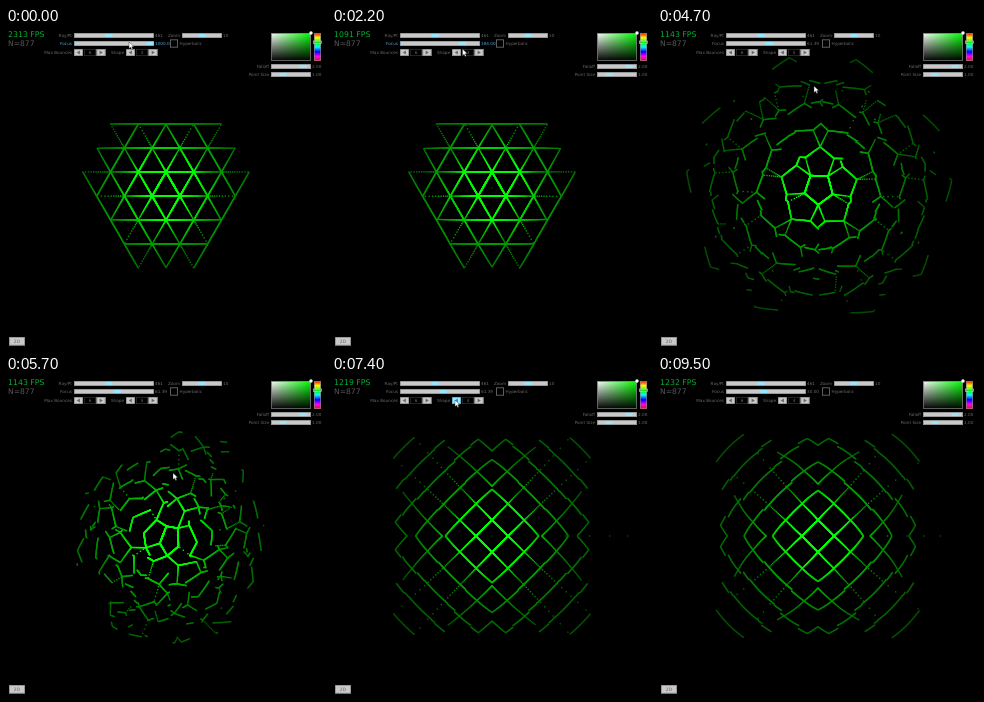
Animation, 320 px wide and 320 px high, one loop 9600 ms. Source, as an HTML page with a canvas:

```html
<!DOCTYPE html>
<html>
<head>
<meta charset="utf-8">
<style>
html, body { margin: 0; width: 100%; height: 100%; overflow: hidden; background: #000; }
canvas { display: block; width: 320px; height: 320px; }
</style>
</head>
<body>
<canvas id="stage" width="320" height="320"></canvas>
<script>
const ctx = document.getElementById('stage').getContext('2d');
const LOOP = 9600, STEP = 100, TAU = Math.PI * 2;
const RAYS = 877, BOUNCES = 6, RADIUS = 16, MID = 160;
const GRAY = '#686868', BORDER = '#838383', BASE = '#c9c9c9', THUMB = '#97e8ff', ACTIVE = '#4e9fcb';
const RIGHT_ARROW = [147, 26], LEFT_ARROW = [123, 24], ROOM_SPOT = [167, 97];

const mix = (a, b, k) => a + (b - a) * k;

function ramp(t, from, to) {
  const k = Math.min(1, Math.max(0, (t - from) / (to - from)));
  return k * k * (3 - 2 * k);
}

// The focus slider is a power curve, so positions are eased rather than values.
const toLevel = focus => (focus / 1000) ** (1 / 4.6);
const toFocus = level => 1000 * level ** 4.6;

function focusLevel(t) {
  let level = mix(1, toLevel(5), ramp(t, 200, 1000));
  level = mix(level, toLevel(384), ramp(t, 1300, 2200));
  level = mix(level, toLevel(61.39), ramp(t, 2200, 2900));
  level = mix(level, toLevel(16), ramp(t, 8000, 8600));
  return mix(level, toLevel(30), ramp(t, 8600, 9100));
}

function cursorAt(t, thumbX) {
  const slider = [thumbX, 14 + 7 * ramp(t, 1300, 2200) * (1 - ramp(t, 7100, 8000))];
  const glide = (a, b, from, to) => a.map((v, i) => mix(v, b[i], ramp(t, from, to)));
  let p = glide([123, 14], slider, 0, 200);
  p = glide(p, RIGHT_ARROW, 2900, 3200);
  p = glide(p, ROOM_SPOT, 4000, 5500);
  p = glide(p, LEFT_ARROW, 6000, 7100);
  p = glide(p, slider, 7700, 8000);
  return glide(p, [thumbX, -10], 9100, 9400);
}

function sidesAt(t) {
  if (t < 3300) return 3;
  return t >= 3800 && t < 7300 ? 5 : 4;
}

function fpsAt(t) {
  if (t < 1000) return 2313;
  if (t < 2500) return 1091;
  if (t < 4600) return 1548;
  if (t < 6600) return 1143;
  return t < 8600 ? 1219 : 1232;
}

// Corners around the viewer; warp squeezes, tilts and shifts the room.
function corners(sides, warp) {
  const start = sides === 5 ? TAU / 4 : -TAU / 4;
  const tilt = 0.17 * warp, squeeze = 1 - 0.38 * warp;
  return Array.from({ length: sides }, (_, k) => {
    const a = start + k * TAU / sides;
    const x = RADIUS * squeeze * Math.cos(a), y = RADIUS * Math.sin(a);
    return [
      x * Math.cos(tilt) - y * Math.sin(tilt) + 4 * warp,
      x * Math.sin(tilt) + y * Math.cos(tilt) + 4 * warp
    ];
  });
}

// Each curved wall is a disc; the room is where all of them overlap.
function mirrors(points, curve) {
  return points.map(([x, y], i) => {
    const [x2, y2] = points[(i + 1) % points.length];
    const side = Math.hypot(x2 - x, y2 - y);
    const depth = Math.sqrt(curve * curve - side * side / 4) / side;
    return [(x + x2) / 2 - (y2 - y) * depth, (y + y2) / 2 + (x2 - x) * depth];
  });
}

function drawRoom(centers, curve) {
  const size = 1.35;
  for (let i = 0; i < RAYS; i++) {
    const angle = i / RAYS * TAU;
    const ux = Math.cos(angle), uy = Math.sin(angle);
    let x = 0, y = 0, dx = ux, dy = uy, length = 0;
    for (let n = 0; n < BOUNCES; n++) {
      let best = Infinity, hit;
      for (const c of centers) {
        const px = x - c[0], py = y - c[1];
        const b = px * dx + py * dy;
        const d = Math.sqrt(Math.max(0, b * b - px * px - py * py + curve * curve)) - b;
        if (d > 1e-6 && d < best) { best = d; hit = c; }
      }
      if (!hit) break;
      x += dx * best;
      y += dy * best;
      length += best;
      const nx = (x - hit[0]) / curve, ny = (y - hit[1]) / curve;
      const dot = 2 * (dx * nx + dy * ny);
      dx -= dot * nx;
      dy -= dot * ny;
      const green = Math.round(255 * Math.min(1, (32 / length) ** 0.8));
      ctx.fillStyle = `rgb(0,${green},0)`;
      ctx.fillRect(MID + ux * length - size / 2, MID + uy * length - size / 2, size, size);
    }
  }
  ctx.fillStyle = '#0a700a';
  ctx.fillRect(MID - 0.5, MID - 0.5, 1, 1);
}

function text(str, x, y, color = GRAY, align = 'left', size = 4.2) {
  ctx.font = `${size}px "DejaVu Sans", sans-serif`;
  ctx.textAlign = align;
  ctx.textBaseline = 'middle';
  ctx.fillStyle = color;
  ctx.fillText(str, x, y);
}

function box(x, y, w, h, fill, stroke = BORDER) {
  ctx.fillStyle = fill;
  ctx.fillRect(x, y, w, h);
  ctx.strokeStyle = stroke;
  ctx.lineWidth = 0.7;
  ctx.strokeRect(x + 0.35, y + 0.35, w - 0.7, h - 0.7);
}

function slider(label, x, y, w, thumbX, value, active) {
  const color = active ? ACTIVE : GRAY;
  box(x, y, w, 5, BASE, active ? ACTIVE : BORDER);
  ctx.fillStyle = THUMB;
  ctx.fillRect(thumbX - 3.5, y + 1, 7, 3);
  text(label, x - 2, y + 2.6, color, 'right');
  text(value, x + w + 1, y + 2.6, color);
}

function arrowButton(x, dir, hot) {
  box(x, 21, 9, 7, hot ? THUMB : BASE, hot ? ACTIVE : BORDER);
  ctx.fillStyle = hot ? '#368baf' : GRAY;
  ctx.beginPath();
  ctx.moveTo(x + 4.5 + dir * 1.8, 24.5);
  ctx.lineTo(x + 4.5 - dir * 1.4, 22.6);
  ctx.lineTo(x + 4.5 - dir * 1.4, 26.4);
  ctx.fill();
}

function spinner(label, x, value, hot) {
  text(label, x - 2, 24.6, GRAY, 'right');
  arrowButton(x, -1, hot === -1);
  box(x + 10, 21, 12, 7, '#000', '#333');
  text(value, x + 16, 24.6, GRAY, 'center');
  arrowButton(x + 22.5, 1, hot === 1);
}

function gradient(x1, y1, colors) {
  const g = ctx.createLinearGradient(265, 5, x1, y1);
  colors.forEach((c, i) => g.addColorStop(i / (colors.length - 1), c));
  return g;
}

function picker() {
  box(265, 5, 40, 28, gradient(305, 5, ['#fff', '#0f0']));
  box(265, 5, 40, 28, gradient(265, 33, ['rgba(0,0,0,0)', '#000']));
  const hues = Array.from({ length: 7 }, (_, i) => `hsl(${i * 60},100%,50%)`);
  box(308, 5, 7, 28, gradient(265, 33, hues));
  ctx.strokeStyle = BASE;
  ctx.strokeRect(307.5, 13, 8, 2.5);
  ctx.fillStyle = '#fff';
  ctx.beginPath();
  ctx.arc(305, 5, 1.7, 0, TAU);
  ctx.fill();
}

function pointer(x, y) {
  ctx.save();
  ctx.translate(x, y);
  const shape = new Path2D('M0 0V6.6L1.6 5.2 2.7 7.6 3.8 7.1 2.8 4.8 4.8 4.6Z');
  ctx.fillStyle = '#fff';
  ctx.fill(shape);
  ctx.strokeStyle = '#222';
  ctx.lineWidth = 0.4;
  ctx.stroke(shape);
  ctx.restore();
}

function render(t) {
  const level = focusLevel(t), focus = toFocus(level);
  const thumbX = 72 + 72 * level;
  const [cx, cy] = cursorAt(t, thumbX);
  const sides = sidesAt(t);
  const warp = sides === 5 ? ramp(t, 4300, 5700) : 0;
  const dragging = t < 2950 || (t >= 8000 && t < 9150);
  const over = x => !dragging && cy >= 20 && cy < 29 && cx >= x && cx < x + 10;
  const hot = over(142) ? 1 : over(120) ? -1 : 0;

  ctx.fillStyle = '#000';
  ctx.fillRect(0, 0, 320, 320);
  const curve = RADIUS * focus;
  drawRoom(mirrors(corners(sides, warp), curve), curve);

  text(fpsAt(t) + ' FPS', 2, 7.3, '#00b02f', 'left', 7.8);
  text('N=' + RAYS, 2, 15.7, '#585858', 'left', 7.6);
  slider('Ray/Pt', 68, 5, 80, 103, '461', false);
  slider('Focus', 68, 13, 80, thumbX, focus.toFixed(2), dragging);
  slider('Zoom', 176, 5, 40, 196, '10', false);
  box(164, 11.5, 8, 8, '#000');
  text('Hyperbolic', 173.5, 15.6);
  spinner('Max Bounces', 68, BOUNCES, 0);
  spinner('Shape', 120, sides, hot);
  picker();
  slider('Falloff', 265, 36, 40, 297, '2.00', false);
  slider('Point Size', 265, 44, 40, 277, '1.00', false);
  box(3, 309, 16, 8.5, BASE);
  text('2D', 11, 313.5, GRAY, 'center', 4.5);
  pointer(cx, cy);
}

function frame() {
  render(Math.floor(performance.now() % LOOP / STEP) * STEP);
  requestAnimationFrame(frame);
}
frame();
</script>
</body>
</html>
```
